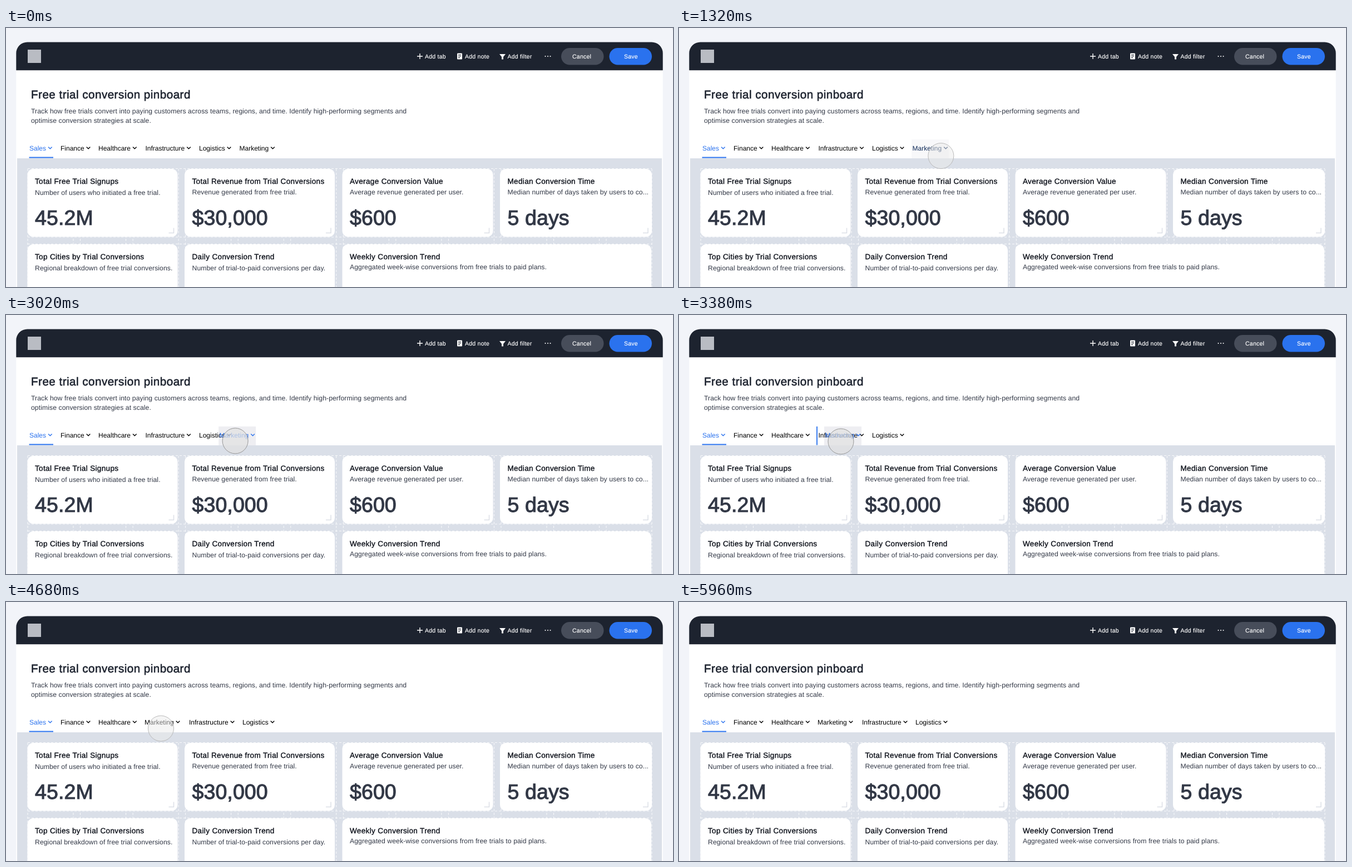
Write an HTML page that moves like this. It is 1199x467 px and loops after 6.46 s.

```html
<!DOCTYPE html>
<html lang="en">
<head>
<meta charset="utf-8">
<title>Pinboard tab reorder</title>
<style>
  html, body { margin: 0; width: 100%; height: 100%; overflow: hidden; background: #f2f4f9; }
  svg { display: block; width: 1199px; height: 467px; }
  text { font: 12px "Liberation Sans", Arial, sans-serif; white-space: pre; text-rendering: geometricPrecision; }
  .body { fill: #323846; font-size: 12.2px; letter-spacing: .08px; }
  .head { fill: #10141d; stroke: #10141d; stroke-width: .4px; font-size: 13.5px; letter-spacing: .36px; }
  .title { fill: #1d232f; stroke: #1d232f; stroke-width: .6px; font-size: 20.6px; letter-spacing: .48px; }
  .big { fill: #323846; stroke: #323846; stroke-width: 1.1px; font-size: 37.5px; letter-spacing: .1px; }
  .tool { fill: #fff; stroke: #fff; stroke-width: .15px; font-size: 10.5px; letter-spacing: .25px; }
</style>
</head>
<body>
<svg id="stage" viewBox="0 0 1199 467"></svg>
<script>
const BLUE = '#2a72ee', LOOP = 6460;
const stage = document.getElementById('stage');

const text = (cls, x, y, s) => `<text class="${cls}" x="${x}" y="${y}">${s}</text>`;
const rect = (x, y, w, h, fill, r = 0) =>
  `<rect x="${x}" y="${y}" width="${w}" height="${h}" rx="${r}" fill="${fill}"/>`;
const path = (d, stroke, w, extra = '') =>
  `<path d="${d}" fill="none" stroke="${stroke}" stroke-width="${w}" ${extra}/>`;

function header() {
  return `<path d="M18.300 76.300V45.500a20 20 0 0 1 20-20H1160.700a20 20 0 0 1 20 20V76.300Z" fill="#1d232f"/>`
    + rect(39, 39, 24, 24, '#b9bcc3')
    + path('M739 51h10M744 46v10', '#fff', 1.4) + text('tool', 753, 54.5, 'Add tab')
    + rect(811, 45.5, 9, 11, '#fff', 1)
    + path('M813 48.5h5M813 51h5M813 53.5h3', '#1d232f', 1) + text('tool', 825, 54.5, 'Add note')
    + '<path d="M887 47h11l-4 5v4.500h-3v-4.500z" fill="#fff"/>' + text('tool', 901.5, 54.5, 'Add filter')
    + [969.5, 974, 978.5].map(x => `<circle cx="${x}" cy="51" r="1" fill="#fff"/>`).join('')
    + rect(998, 36, 76.5, 30.5, '#474d5a', 15.2) + text('tool', 1018, 54.5, 'Cancel')
    + rect(1084.5, 36, 76.5, 30.5, BLUE, 15.2) + text('tool', 1111, 54.5, 'Save');
}

// Dashed twelve-column layout grid behind the cards
function grid() {
  let d = '';
  for (let i = 0; i < 12; i++) {
    const x = 39 + i * 94.55;
    d += `M${x} 254V467M${x + 82} 254V467`;
  }
  for (const y of [253.5, 377, 389.5]) d += `M39 ${y}H1161`;
  return path(d, '#fff', 1, 'stroke-dasharray="4 3" opacity=".8"');
}

function card(x, y, w, h, head, sub, subY, value) {
  let out = rect(x, y, w, h, '#fff', 10.5)
    + text('head', x + 13.5, y + 27, head) + text('body', x + 13.5, subY, sub);
  if (value) out += text('big', x + 13.5, 355, value)
    + path(`M${x + w - 16} 369.500h9v-9`, '#dcdfe6', 1.5);
  return out;
}

function tab(id, x, label, color = '#000') {
  return `<g id="${id}" transform="translate(${x})" fill="${color}" stroke="${color}">`
    + `<text y="221" stroke="none">${label}</text>`
    + '<path fill="none" stroke-width="1.400"/></g>';
}

stage.innerHTML = rect(18.3, 70, 1162.4, 400, '#fff') + header()
  + text('title', 45, 126.5, 'Free trial conversion pinboard')
  + text('body', 45, 153.5, 'Track how free trials convert into paying customers across teams, regions, and time. Identify high-performing segments and')
  + text('body', 45, 171, 'optimise conversion strategies at scale.')
  + rect(20, 235, 1159, 232, '#dadfe8') + grid()
  + card(38.5, 254, 270, 122.5, 'Total Free Trial Signups', 'Number of users who initiated a free trial.', 300.5, '45.2M')
  + card(321, 254, 270, 122.5, 'Total Revenue from Trial Conversions', 'Revenue generated from free trial.', 300, '$30,000')
  + card(604.5, 254, 271, 122.5, 'Average Conversion Value', 'Average revenue generated per user.', 300, '$600')
  + card(888, 254, 273, 122.5, 'Median Conversion Time', 'Median number of days taken by users to co...', 300, '5 days')
  + card(38.5, 390, 270, 100, 'Top Cities by Trial Conversions', 'Regional breakdown of free trial conversions.', 437)
  + card(321, 390, 270, 100, 'Daily Conversion Trend', 'Number of trial-to-paid conversions per day.', 437)
  + card(604.5, 390, 555.5, 100, 'Weekly Conversion Trend', 'Aggregated week-wise conversions from free trials to paid plans.', 435)
  + rect(41.5, 232.5, 43.5, 2, BLUE)
  + tab('sales', 42, 'Sales', BLUE) + tab('finance', 98, 'Finance') + tab('health', 166, 'Healthcare')
  + tab('infra', 250.5, 'Infrastructure') + tab('logistics', 347, 'Logistics')
  + `<rect id="slot" x="247" y="201" width="2" height="33.500" fill="${BLUE}"/>`
  + '<rect id="hover" y="201" width="67" height="34" fill="#5a5a82" fill-opacity=".1"/>'
  + tab('marketing', 419.5, 'Marketing')
  + '<circle id="cursor" r="23"/>';

const el = id => document.getElementById(id);
for (const g of stage.querySelectorAll('g')) {
  const end = g.firstChild.getComputedTextLength();
  g.lastChild.setAttribute('d', `M${end + 4} 214.500l3.300 3.200l3.300 -3.200`);
}

// Cubic bezier (.4, 0, .2, 1)
function smooth(p) {
  let lo = 0, hi = 1, s = .5;
  for (let i = 0; i < 20; i++) {
    const x = 1.2 * s * (1 - s) ** 2 + .6 * s * s * (1 - s) + s ** 3;
    if (x < p) lo = s; else hi = s;
    s = (lo + hi) / 2;
  }
  return s * s * (3 - 2 * s);
}
const snap = p => 1 - (1 - p) ** 6;

// Each step is [start, end, target value]
function track(t, from, steps, ease = smooth) {
  let v = from;
  for (const [a, b, to] of steps) {
    if (t < a) break;
    v += (to - v) * (t >= b ? 1 : ease((t - a) / (b - a)));
  }
  return v;
}

function set(id, attrs) {
  for (const k in attrs) el(id).setAttribute(k, attrs[k]);
}
const moveTab = (id, x) => set(id, { transform: `translate(${x})` });

function draw(t) {
  const cx = track(t, 1222, [[300, 620, 632], [940, 1600, 444], [1600, 1760, 448],
    [2860, 3520, 286.5], [4080, 4500, 278.5], [5100, 5500, 1217]]);
  const cy = track(t, 0, [[300, 620, 255], [940, 1600, 226.5], [1600, 1760, 224],
    [2860, 3200, 228], [5100, 5500, 0]]);
  const press = track(t, 0, [[1600, 1760, .4], [2480, 2480, 1], [4080, 4500, 0]]);
  const hover = track(t, 0, [[1200, 1600, 1], [4080, 4500, 0]]);
  const mx = track(t, 419.5, [[2860, 3520, 258], [4080, 4500, 249]]);
  const drop = [3520, 3940];

  moveTab('infra', track(t, 250.5, [[...drop, 329]], snap));
  moveTab('logistics', track(t, 347, [[...drop, 425]], snap));
  moveTab('marketing', mx);
  const ink = `color-mix(in srgb, ${BLUE} ${hover * 100}%, #000)`;
  el('marketing').style.fill = el('marketing').style.stroke = ink;
  set('hover', { x: mx - 1.5, opacity: hover });
  set('slot', { opacity: t < 4680 ? track(t, 0, [[3100, 3520, 1]]) : 0 });

  const shade = 236 - 10 * press, ring = 185 - 35 * press;
  set('cursor', {
    cx, cy,
    fill: `rgba(${shade},${shade},${shade},${.5 + .2 * press})`,
    stroke: `rgb(${ring},${ring},${ring})`,
    opacity: track(t, 1, [[5880, 5960, 0]])
  });
}

function frame() {
  draw(performance.now() % LOOP);
  requestAnimationFrame(frame);
}
frame();
</script>
</body>
</html>
```
